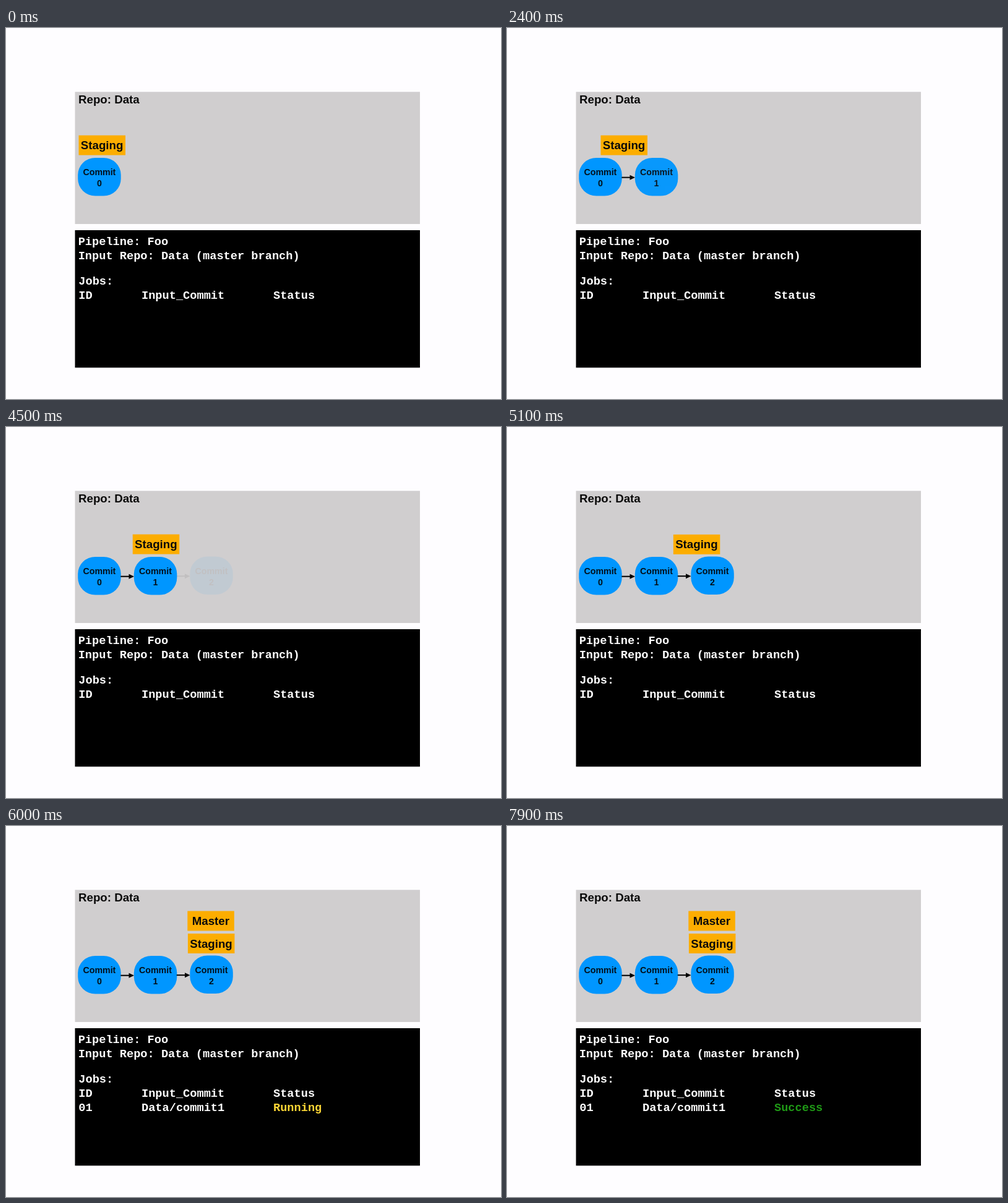
Recreate the animation shown at these times as an HTML page. Size 800x600 px, loop 8 s.

```html
<!DOCTYPE html>
<html lang="en">
<head>
<meta charset="utf-8">
<title>Deferred processing</title>
<style>
  html, body { margin: 0; width: 100%; height: 100%; overflow: hidden; background: #fefdff; }
  svg { display: block; width: 800px; height: 600px; }
  text { font: bold 18.7px "Liberation Sans", Arial, sans-serif; fill: #0a0a0a; }
  .mid { text-anchor: middle; }
  .small { font-size: 14.2px; fill: #02101c; }
  .mono { font: bold 18.65px "Liberation Mono", "Courier New", monospace; fill: #fff; }
  .running { fill: #fbd535; }
  .success { fill: #1f9a16; }
  .label { fill: #fcad00; }
  .commit { fill: #0096ff; }
</style>
</head>
<body>
<svg viewBox="0 0 800 600">
  <rect x="111.5" y="103.3" width="557.5" height="213.7" fill="#d0cecf"/>
  <rect x="111.5" y="327" width="557.5" height="222.3"/>
  <text x="117" y="122">Repo: Data</text>
  <g id="commits"></g>
  <g id="labels"></g>
  <g id="console"></g>
</svg>
<script>
const LOOP = 8000, STEP = 100;
const byId = id => document.getElementById(id);

function add(parent, markup) {
  parent.insertAdjacentHTML("beforeend", markup);
  return parent.lastElementChild;
}

function addCommit(number, x, y) {
  const mid = x + 34.7, arrowY = y + 31.7;
  const arrow = number === 0 ? "" :
    `<path d="M${x - 21.5} ${arrowY}H${x - 7}" stroke="#000" stroke-width="2"/>
     <path d="M${x + .2} ${arrowY}l-8.5 -4v8z"/>`;
  return add(byId("commits"), `<g>
    <rect class="commit" x="${x}" y="${y}" width="69.5" height="61.5" rx="28" ry="27.5"/>
    ${arrow}
    <text class="mid small" x="${mid}" y="${y + 28}">Commit</text>
    <text class="mid small" x="${mid}" y="${y + 46}">${number}</text></g>`);
}

const addLabel = name => add(byId("labels"), `<g>
  <rect class="label" width="75.5" height="32"/>
  <text class="mid" x="37.6" y="22.5">${name}</text></g>`);

const place = (el, x, y) => el.setAttribute("transform", `translate(${x} ${y})`);

const mono = (x, y, text, style = "") =>
  `<text class="mono ${style}" x="${x}" y="${y}">${text}</text>`;

const columns = [117.3, 219, 432];
const row = (y, cells) => cells.map((cell, i) => mono(columns[i], y, cell)).join("");

addCommit(0, 116.2, 210);
const commit1 = addCommit(1, 206.8, 210);
const commit2 = addCommit(2, 297.3, 209.5);
const staging = addLabel("Staging");
const master = addLabel("Master");
place(master, 293.3, 137.5);

const terminal = byId("console");
add(terminal, `<g>${mono(116.7, 351, "Pipeline: Foo")}
  ${mono(116.7, 373.6, "Input Repo: Data (master branch)")}
  ${mono(117.3, 414.8, "Jobs:")}
  ${row(437.8, ["ID", "Input_Commit", "Status"])}</g>`);
const job = add(terminal, `<g>${row(460.8, ["01", "Data/commit1"])}</g>`);
const running = add(terminal, mono(432, 460.8, "Running", "running"));
const success = add(terminal, mono(432, 460.8, "Success", "success"));

const progress = (t, start, length) => Math.min(1, Math.max(0, (t - start) / length));
const ease = p => (1 - Math.cos(Math.PI * p)) / 2;
const fade = (el, p) => el.setAttribute("opacity", p);

function draw(t) {
  fade(commit1, progress(t, 1970, 450));
  fade(commit2, progress(t, 4470, 450));

  const first = ease(progress(t, 1970, 1000));
  const second = ease(progress(t, 4455, 1000));
  place(staging, 117.5 + 86.8 * first + 89.6 * second, 173.6 + .4 * second);

  const shown = progress(t, 5480, 450);
  const done = progress(t, 6600, 400);
  fade(master, shown);
  fade(job, shown);
  fade(running, shown * (1 - done));
  fade(success, done);
}

const begin = performance.now();
function tick() {
  const t = (performance.now() - begin) % LOOP;
  draw(Math.floor(t / STEP) * STEP);
  requestAnimationFrame(tick);
}
tick();
</script>
</body>
</html>
```
